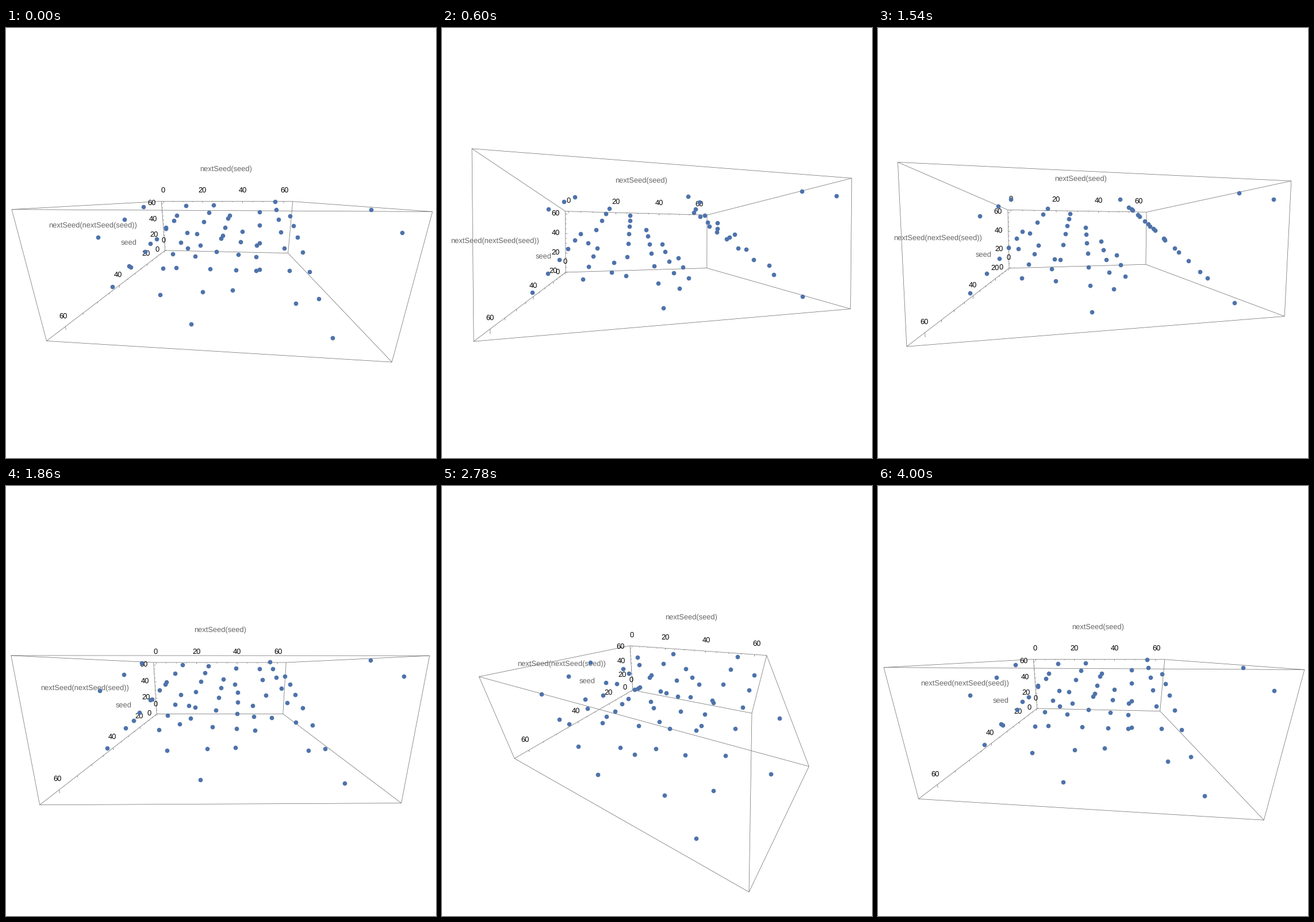
Animation of 748 by 748 pixels, one loop 4020 ms. Source, as a matplotlib script:

```python
import itertools

import matplotlib.pyplot as plt
import numpy as np
from matplotlib.animation import FuncAnimation
from matplotlib.collections import LineCollection

SIZE, DPI = 748, 100
PX = 72 / DPI
MID = 373  # centre and half width of the view
STEPS = 200
HALF = np.array([0.5, 0.5, 0.2])
RADIUS = np.linalg.norm(HALF)
# plot range of each axis: padded for x and y, tight for z
LOW = np.array([-1.26, -1.26, 0])
SPAN = np.array([65.52, 65.52, 63])
GRAY, BLUE = "#666666", "#4e73aa"

plt.rcParams["text.hinting"] = "none"


def next_seed(s):
    return (7 * s + 5) % 64


def to_box(v):
    return ((np.asarray(v, float) - LOW) / SPAN - 0.5) * 2 * HALF


def view_point(n):
    q = np.sin(2 * np.pi * n / STEPS)
    return np.array([
        0.9395 + 0.138 * q - 0.042 * q**2,
        0.0709 - 0.3525 * q - 0.0165 * q**2,
        0.2305 - 0.237 * q - 0.0539 * q**2 + 0.0145 * q**3,
    ])


def project(p, eye):
    """Perspective view of the box centre, its bounding sphere filling the view."""
    dist = np.linalg.norm(eye)
    back = eye / dist
    right = np.array([-eye[1], eye[0], 0]) / np.hypot(eye[0], eye[1])
    up = np.cross(back, right)
    focal = MID * np.sqrt(dist**2 - RADIUS**2) / RADIUS
    scale = focal / (dist - p @ back)
    return MID + np.column_stack([p @ right * scale, -(p @ up) * scale])


seeds = np.arange(64)
points = to_box(np.column_stack(
    [seeds, next_seed(seeds), next_seed(next_seed(seeds))]))

corners = np.array(list(itertools.product([-1, 1], repeat=3))) * HALF
edges = np.array([(a, b) for a, b in itertools.combinations(corners, 2)
                  if np.count_nonzero(a != b) == 1])

fig = plt.figure(figsize=(SIZE / DPI, SIZE / DPI), dpi=DPI, facecolor="white")
ax = fig.add_axes([0, 0, 1, 1])
ax.set_xlim(0, SIZE)
ax.set_ylim(SIZE, 0)
ax.axis("off")

box = LineCollection([], colors=GRAY, linewidths=0.7 * PX, zorder=1)
marks = LineCollection([], colors=GRAY, linewidths=0.7 * PX, zorder=1)
ax.add_collection(box)
ax.add_collection(marks)
dots, = ax.plot([], [], "o", ms=7.7 * PX, mfc=BLUE, mec="none", zorder=3)

labels = []  # text, half width, half height, gap
anchors, outward, ticks = [], [], []


def add_label(s, pos, out, gap, half_h, color):
    t = ax.text(0, 0, s, family="Liberation Sans", fontsize=12.9 * PX,
                color=color, ha="center", va="baseline", zorder=2)
    labels.append((t, t.get_window_extent().width / 2, half_h, gap))
    anchors.append(pos)
    outward.append(out)


def add_axis(k, title, base, out):
    """Axis along dimension k through base, labels on the side of out."""
    base, out = np.array(base) * HALF, np.array(out, float)
    for v in range(0, 61, 5):
        pos = base.copy()
        pos[k] = to_box([v] * 3)[k]
        major = v % 20 == 0
        ticks.append((pos, pos - out * (0.012 if major else 0.0065)))
        if major:
            add_label(str(v), pos, out, 10, 7.4, "black")
    add_label(title, base, out, 46, 8.6, GRAY)


add_axis(0, "seed", (0, -1, -1), (0, 0, 1))
add_axis(1, "nextSeed(seed)", (-1, 0, 1), (0, 0, 1))
add_axis(2, "nextSeed(nextSeed(seed))", (-1, -1, 0), (0, -1, 0))
anchors, outward, ticks = map(np.array, (anchors, outward, ticks))


def update(n):
    eye = view_point(n)
    box.set_segments(project(edges.reshape(-1, 3), eye).reshape(-1, 2, 2))
    marks.set_segments(project(ticks.reshape(-1, 3), eye).reshape(-1, 2, 2))
    dots.set_data(*project(points, eye).T)
    start = project(anchors, eye)
    way = project(anchors + outward * 1e-3, eye) - start
    way /= np.linalg.norm(way, axis=1, keepdims=True)
    for (t, half_w, half_h, gap), p, d in zip(labels, start, way):
        x, y = p + d * (gap + np.array([half_w, half_h]))
        t.set_position((x, y + 2))
    return [box, marks, dots] + [lab[0] for lab in labels]


anim = FuncAnimation(fig, update, frames=STEPS + 1, interval=20,
                     init_func=lambda: update(0), repeat=True, repeat_delay=0)
plt.show()
```
